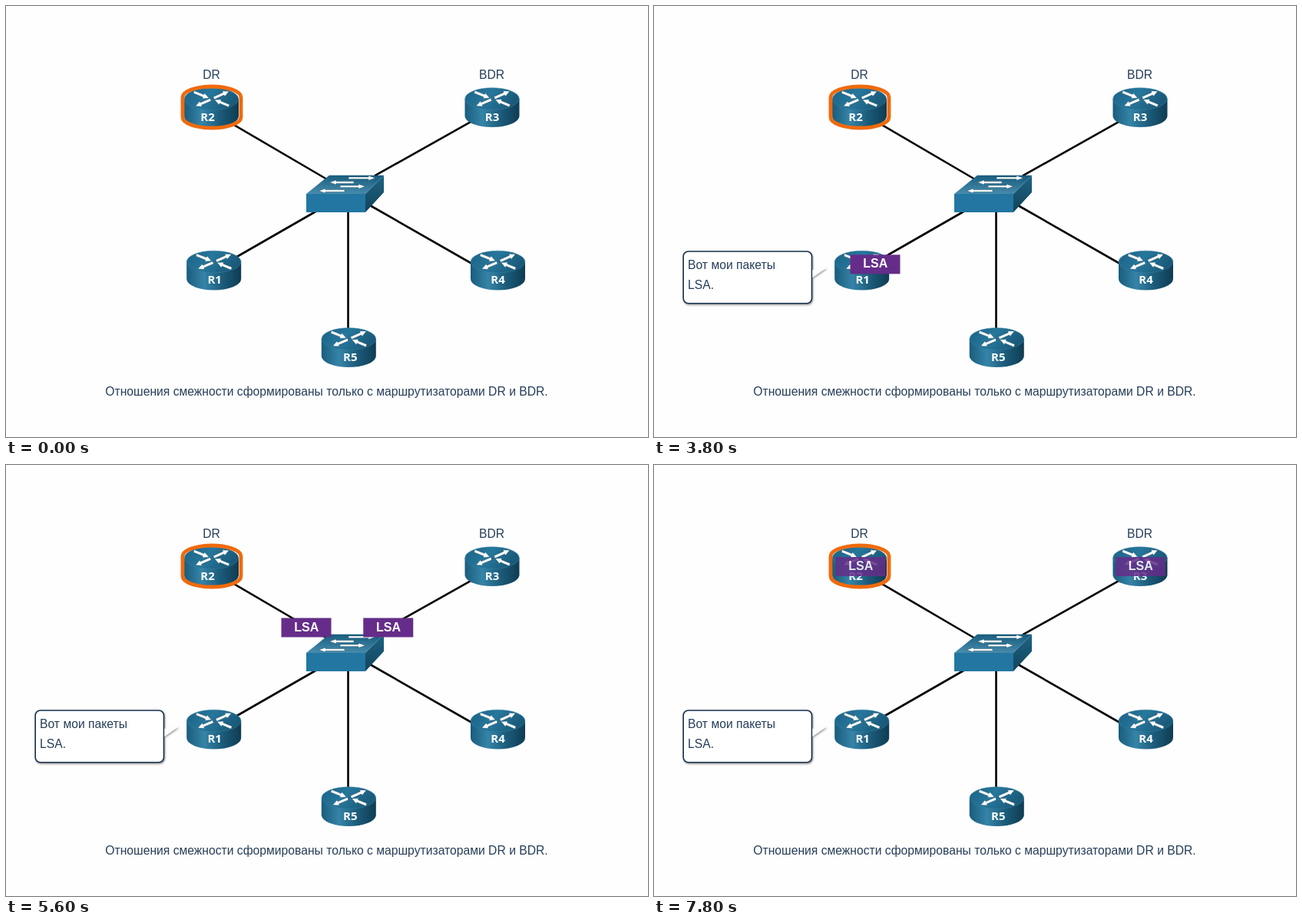
Recreate the animation shown at these times as an HTML page. Size 836x562 px, loop 8 s.

```html
<!DOCTYPE html>
<html lang="ru">
<head>
<meta charset="utf-8">
<style>
  html, body { margin: 0; width: 100%; height: 100%; overflow: hidden; background: #fefefe; }
  svg { display: block; }
  text { font: 15.7px "Liberation Sans", Arial, sans-serif; fill: #263e59; }
  .bold { font: 700 15px "Open Sans", sans-serif; fill: #fff; text-anchor: middle; }
  .packet-label { font: 700 16px "Liberation Sans", Arial, sans-serif; fill: #fff; text-anchor: middle; }
  .mid { text-anchor: middle; }
  .arrow { fill: #fff; stroke: #174a63; stroke-width: .5; }
</style>
</head>
<body>
<svg width="836" height="562" viewBox="0 0 836 562">
  <defs>
    <linearGradient id="body">
      <stop offset="0" stop-color="#1a5c7c"/>
      <stop offset=".32" stop-color="#3584a8"/>
      <stop offset=".65" stop-color="#1c5c7b"/>
      <stop offset="1" stop-color="#0f3c53"/>
    </linearGradient>
    <linearGradient id="lid" x2="1" y2=".3">
      <stop offset="0" stop-color="#1c6186"/>
      <stop offset=".5" stop-color="#26779c"/>
      <stop offset="1" stop-color="#1a5a7a"/>
    </linearGradient>
    <linearGradient id="top" x1=".5" y1="0" x2=".4" y2="1">
      <stop offset="0" stop-color="#185d7d"/>
      <stop offset="1" stop-color="#478bad"/>
    </linearGradient>
    <linearGradient id="side" x2="0" y2="1">
      <stop offset="0" stop-color="#1d6486"/>
      <stop offset="1" stop-color="#124359"/>
    </linearGradient>
    <filter id="shadow" x="-10%" y="-15%" width="120%" height="135%">
      <feDropShadow dx="1" dy="1.5" stdDeviation="1.2" flood-color="#444" flood-opacity=".55"/>
    </filter>
    <g id="packet">
      <rect x="-32.5" y="-12.5" width="65" height="25" fill="#652d89"/>
      <text class="packet-label" x=".3" y="4.6">LSA</text>
    </g>
  </defs>

  <path d="M268 138.2L418 226M633 135.4L480 221.4M271 344L405 267M640 355L474 260M445.5 440V262"
        fill="none" stroke="#000" stroke-width="2.6"/>

  <g id="switch">
    <path d="M421 220.7H492L468 245H391Z" fill="url(#top)"/>
    <path d="M492 220.7V243L468 269V245Z" fill="url(#side)"/>
    <path d="M391 245H468V269H391Z" fill="#2276a1"/>
  </g>
  <g id="routers"></g>
  <path d="M230 119A38 14 0 0 1 306 119V145A38 14 0 0 1 230 145Z"
        fill="none" stroke="#f06a0c" stroke-width="4.8"/>

  <text class="mid" x="267.5" y="95">DR</text>
  <text class="mid" x="632.5" y="95">BDR</text>
  <text x="129.3" y="508">Отношения смежности сформированы только с маршрутизаторами DR и BDR.</text>

  <g id="bubble">
    <rect x="38.2" y="320" width="167.3" height="67.8" rx="6.5" fill="#fff" stroke="#17304d"
          stroke-width="1.6" filter="url(#shadow)"/>
    <path d="M206.3 344L225 341L206.3 354Z" fill="#fff" filter="url(#shadow)"/>
    <text x="44" y="343">Вот мои пакеты</text>
    <text x="44" y="369">LSA.</text>
  </g>

  <use id="sent" href="#packet"/>
  <use id="toBdr" href="#packet"/>
  <use id="toDr" href="#packet"/>
</svg>
<script>
const LOOP = 8000, STEP = 200;
const $ = id => document.getElementById(id);

function arrow(x1, y1, x2, y2, w, head) {
  const length = Math.hypot(x2 - x1, y2 - y1), ux = (x2 - x1) / length, uy = (y2 - y1) / length;
  const at = (along, across) => `${x1 + ux * along - uy * across},${y1 + uy * along + ux * across}`;
  const neck = length - head;
  const points = [at(0, -w), at(neck, -w), at(neck, -2.2 * w), at(length, 0),
                  at(neck, 2.2 * w), at(neck, w), at(0, w)];
  return `<polygon class="arrow" points="${points.join(' ')}"/>`;
}

function router(name, x, y, labelX) {
  return `<g transform="translate(${x} ${y})">
    <path d="M-35.5 14.5V37A35.5 14.5 0 0 0 35.5 37V14.5Z" fill="url(#body)"/>
    <ellipse cy="14.5" rx="35.3" ry="14.3" fill="url(#lid)" stroke="#3680a3" stroke-width=".5"/>
    ${arrow(-23, 5.5, -3, 13.5, 1.8, 8)}${arrow(3, 13.5, 23, 4.5, 1.8, 8)}
    ${arrow(-1, 15.5, -21, 24, 1.8, 8)}${arrow(23, 23.5, 4, 15.5, 1.8, 8)}
    <text class="bold" x="${labelX}" y="43">${name}</text></g>`;
}

$('routers').innerHTML =
  router('R1', 270.7, 319, 1) + router('R2', 267.5, 106.7, -5) + router('R3', 633, 106.5, 0) +
  router('R4', 640.5, 319, 0) + router('R5', 446.3, 419.5, 2);
$('switch').innerHTML +=
  arrow(446, 224.3, 481, 224.3, 1.4, 9) + arrow(453, 230, 421, 230, 1.4, 9) +
  arrow(435, 235.3, 468, 235.3, 1.4, 9) + arrow(441, 241, 407, 241, 1.4, 9);

// Each path is a list of [time, x, y].
const paths = {
  sent: [[3660, 272, 346.5], [4400, 356.5, 295.5], [5150, 442, 244]],
  toDr: [[5150, 442, 244], [5200, 436.5, 241.5], [6000, 345.5, 182.5], [6400, 302.5, 154.5], [6710, 269, 132.5]],
  toBdr: [[5150, 442, 244], [5200, 447.5, 241.5], [6000, 548, 182.5], [6400, 596, 154.5], [6710, 633.5, 132.5]]
};

function position(path, t) {
  if (t <= path[0][0]) return path[0].slice(1);
  const i = path.findIndex(p => p[0] > t);
  if (i < 0) return path.at(-1).slice(1);
  const a = path[i - 1], b = path[i], k = (t - a[0]) / (b[0] - a[0]);
  return [a[1] + (b[1] - a[1]) * k, a[2] + (b[2] - a[2]) * k];
}

function place(id, t, opacity) {
  $(id).setAttribute('transform', `translate(${position(paths[id], t)})`);
  $(id).setAttribute('opacity', opacity);
}

function draw(now) {
  const t = Math.floor(now % LOOP / STEP) * STEP;
  const delivered = t < 5200 ? 0 : t < 7800 ? 1 : .85;
  $('bubble').setAttribute('opacity', t < 1200 ? 0 : 1);
  place('sent', t, t < 2600 || t >= 5200 ? 0 : t < 2800 ? .72 : 1);
  place('toDr', t, delivered);
  place('toBdr', t, delivered);
  requestAnimationFrame(draw);
}
draw(performance.now());
</script>
</body>
</html>
```
